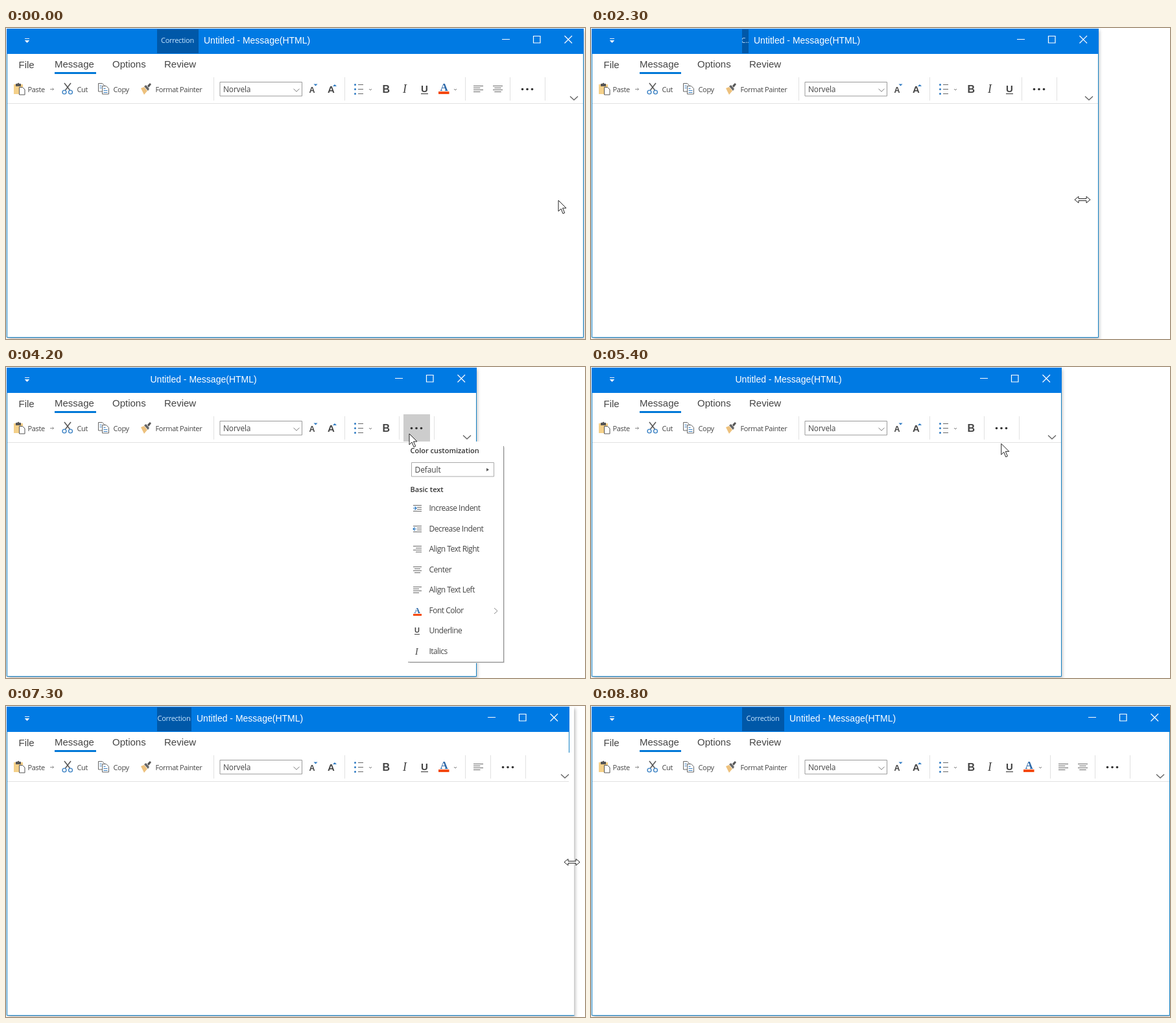
Animation of 893x480 px, one loop 9 s. Source, as an HTML page:

```html
<!DOCTYPE html>
<html lang="en">
<head>
<meta charset="utf-8">
<title>Adaptive ribbon</title>
<style>
html, body { margin: 0; width: 100%; height: 100%; overflow: hidden; background: #fff; }
svg { display: block; width: 893px; height: 480px; }
text { fill: #444; font: 11px "Open Sans", sans-serif; letter-spacing: -.35px; white-space: pre; }
.tab { font: 15px "Liberation Sans", Arial, sans-serif; letter-spacing: 0; }
.title { font: 14px "Liberation Sans", Arial, sans-serif; letter-spacing: 0; fill: #fff; }
.item { font-size: 12px; letter-spacing: -.5px; }
.head { font-weight: 600; letter-spacing: 0; fill: #333; }
.bold { font: bold 16px "Liberation Sans", Arial, sans-serif; letter-spacing: 0; }
.serif { font: 17px "Liberation Serif", serif; letter-spacing: 0; }
.line { fill: none; stroke: #666; }
.sep { stroke: #e1e1e1; }
#body { filter: drop-shadow(2px 3px 2.5px #0004); }
</style>
</head>
<body>
<svg viewBox="0 0 893 480">
  <rect id="body" x="1" y="1" height="477" fill="#fff"/>
  <path id="frame" fill="none" stroke="#1280c4"/>
  <rect id="bar" x="1" y="1" height="39" fill="#007ae3"/>
  <path d="M29 16.5h7M29.5 19.5h6l-3 3z" fill="#fff" stroke="#fff" stroke-width=".9"/>
  <svg id="tab" x="233" y="2" height="37">
    <rect width="100" height="37" fill="#0058a8"/>
    <text id="tabText" y="21" text-anchor="middle" style="fill:#c6e6ff;letter-spacing:-.3px"></text>
  </svg>
  <text id="title" class="title" y="24">Untitled - Message(HTML)</text>
  <path id="controls" fill="none" stroke="#fff" stroke-width="1.2"
    d="M-125 17.5h12M-76.5 12.5h10.5v10.5h-10.5zM-28.5 12l11.5 11.5M-17 12l-11.5 11.5"/>
  <text class="tab" x="19.500" y="62">File</text>
  <text class="tab" x="75" y="61">Message</text>
  <text class="tab" x="164" y="61">Options</text>
  <text class="tab" x="244" y="61">Review</text>
  <rect x="75" y="68" width="64" height="3" fill="#0078d7"/>
  <path id="rule" class="sep"/>
  <g id="ribbon"></g>
  <rect id="hover" x="613" y="73" width="41" height="42" fill="#cdcdcd"/>
  <g id="more">
    <path class="sep" d="M.5 76v36M54.500 76v36"/>
    <g fill="#333"><circle cx="19.500" cy="94.500" r="1.800"/><circle cx="27" cy="94.500" r="1.800"/><circle cx="34.500" cy="94.500" r="1.800"/></g>
  </g>
  <path id="chevron" class="line" stroke-width="1.400" d="M-20 105.500l6 5.500l6 -5.500"/>
  <g id="menu"></g>
  <path id="arrow" d="M0 0v17l4-4l3 7.500l2.700-1.200l-3.200-7.300h5.500z" fill="#fff" stroke="#222" stroke-linejoin="round"/>
  <path id="resize" d="M-12 0l6-5v3.500h12v-3.500l6 5l-6 5v-3.500h-12v3.500z" fill="#fff" stroke="#222"/>
</svg>
<script>
const $ = id => document.getElementById(id);
const set = (id, name, value) => $(id).setAttribute(name, value);
const show = (id, on) => set(id, "visibility", on ? "visible" : "hidden");
const label = (x, y, s, cls = "", style = "") => `<text x="${x}" y="${y}" class="${cls}" style="${style}">${s}</text>`;
const line = (d, color = "#666", w = 1) => `<path d="${d}" fill="none" stroke="${color}" stroke-width="${w}"/>`;
const shape = (d, fill, stroke = "none") => `<path d="${d}" fill="${fill}" stroke="${stroke}"/>`;
const sep = x => `<path class="sep" d="M${x}.5 76v36"/>`;
const drop = (x, y, r = 2) => line(`M${x - r} ${y - r / 2}l${r} ${r}l${r} ${-r}`, "#777");

// Four text lines; align 0 is left, .5 centre, 1 right
function paragraph(x, y, width, align) {
  const short = width * .7;
  return line([0, 1, 2, 3].map(i => {
    const w = i % 2 ? short : width;
    return `M${x + (width - w) * align} ${y + i * 3 + .5}h${w}`;
  }).join(""));
}

const colorA = (x, y, size) => label(x, y, "A", "serif", `fill:#2b67a8;font-size:${size}px;font-weight:bold`);

$("ribbon").innerHTML =
  // Paste, cut, copy, format painter
  shape("M12 87h14v15h-14z", "#f4d08a") + shape("M15 86h2.500q1.500-3 3 0h2.500v4h-8z", "#555") +
  shape("M20.500 91.500h5l3.500 3.500v8h-8.500z", "#fff", "#555") +
  label(33.500, 99, "Paste") + line("M68 94.500h5.500m-2-2l2 2l-2 2", "#777", .8) +
  line("M90 85l8.500 11M100 85l-8.500 11", "#555", 1.500) +
  `<g fill="none" stroke="#3c82c4" stroke-width="1.400"><circle cx="90" cy="99" r="2.900"/><circle cx="99.500" cy="99" r="2.900"/></g>` +
  label(109.500, 99, "Cut") +
  shape("M142.500 85.500h6l3 3v9.500h-9z", "#fff", "#666") + shape("M148.500 89.500h6l4 4v8.500h-10z", "#fff", "#666") +
  line("M144.500 89.500h3M144.500 92.500h3M150.500 93.500h3M150.500 96.500h6M150.500 99.500h6", "#3c82c4") +
  label(165.500, 99, "Copy") +
  shape("M208 93l5-2l5 6l-5 6z", "#edc17d") + shape("M213 90l3-2l5 6l-2 3z", "#666") + shape("M218 89l4-4l2 2l-4 5z", "#555") +
  label(230.500, 99, "Format Painter") + sep(320) +
  // Font box and size buttons
  line("M330 83.500h126.500v21.500h-126.500z", "#999") + label(335, 99, "Norvela", "item", "letter-spacing:-.2px") + drop(448, 96, 4.500) +
  label(467.500, 100, "A", "bold", "font-size:12.500px") + shape("M474.500 86.500h6l-3 3z", "#2b79c2") +
  label(496, 100, "A", "bold", "font-size:15px") + shape("M504 90h6l-3-3z", "#2b79c2") + sep(522) +
  // Bullets and text styles
  [87.500, 94.500, 101.500].map(y => `<circle cx="538.500" cy="${y}" r="1.500" fill="#2b79c2"/>` + line(`M543 ${y}h8`)).join("") +
  drop(562, 95) + label(580.500, 100, "B", "bold") +
  `<g id="tool1">${label(612, 100, "I", "serif", "font-style:italic;font-size:18px")}</g>` +
  `<g id="tool2">${label(640, 98.500, "U", "bold", "font-size:15px")}${line("M640 101.500h11", "#444", 1.200)}</g>` +
  `<g id="tool3">${colorA(669.500, 97, 17)}${shape("M667 98h16.500v4h-16.500z", "#f4490f")}${drop(693, 95)}</g>` +
  `<g id="tool4">${sep(708)}${paragraph(721, 89, 15, 0)}</g>` +
  `<g id="tool5">${paragraph(751, 89, 15, .5)}</g>`;

const indent = (y, dir) => line(`M628 ${y - 4.500}h13M634 ${y - 1.500}h7M634 ${y + 1.500}h7M628 ${y + 4.500}h13`) +
  line(`M628 ${y}h5` + (dir > 0 ? "m-2.500-2.500l2.500 2.500l-2.500 2.500" : "m-2.500-2.500l-2.500 2.500l2.500 2.500"), "#2b79c2", 1.200);
const rows = [
  ["Increase Indent", y => indent(y, 1)],
  ["Decrease Indent", y => indent(y, -1)],
  ["Align Text Right", y => paragraph(628, y - 5, 13, 1)],
  ["Center", y => paragraph(628, y - 5, 13, .5)],
  ["Align Text Left", y => paragraph(628, y - 5, 13, 0)],
  ["Font Color", y => colorA(629.500, y + 4, 13) + shape(`M628 ${y + 5}h13v3h-13z`, "#f4490f") + line(`M753 ${y - 4}l5 4.500l-5 4.500`, "#888")],
  ["Underline", y => label(630, y + 3, "U", "bold", "font-size:11px") + line(`M630 ${y + 5.500}h8`, "#444")],
  ["Italics", y => label(631, y + 5, "I", "serif", "font-style:italic;font-size:14px")]
];
$("menu").innerHTML = shape("M620 115h147v340h-147z", "#fff") +
  line("M767.500 122v334M620 455.500h148", "#8f8f8f") + line("M768.500 124v332.500h-146", "#ddd") +
  label(623.500, 132.500, "Color customization", "head") +
  line("M625.500 147.500h127v21.500h-127z", "#aaa") + label(630.500, 163, "Default", "item", "letter-spacing:-.1px") +
  shape("M741 156l4 2.500l-4 2.500z", "#555") + label(623.500, 193, "Basic text", "head") +
  rows.map(([name, icon], i) => {
    const y = Math.round(218 + i * 31.55);
    return icon(y) + label(652.500, y + 4, name, "item");
  }).join("");

// Piecewise motion: [time, value] pairs
function along(keys, t) {
  let i = 1;
  while (i < keys.length - 1 && t > keys[i][0]) i++;
  const [t0, a] = keys[i - 1], [t1, b] = keys[i];
  const p = Math.max(0, Math.min(1, (t - t0) / (t1 - t0)));
  return a + (b - a) * p;
}
const widthKeys = [[0, 890], [1700, 890], [1800, 889], [1900, 881], [2000, 866], [2300, 782], [2500, 740], [2700, 725],
  [6400, 725], [6700, 757], [7000, 811], [7300, 868], [7600, 892]];
const gapKeys = [[6400, 0], [6700, 8], [7300, 8], [7600, 0]];
const xKeys = [[0, 852], [1000, 873], [1800, 873], [2300, 758], [2700, 709], [3000, 709], [3700, 622], [5300, 622],
  [6200, 719], [6400, 719], [7300, 873], [7600, 885], [8000, 885], [8300, 870], [8800, 735]];
const yKeys = [[0, 266], [1000, 265], [3000, 265], [3700, 103], [5300, 103], [6200, 241], [8000, 241], [8300, 300], [8800, 485]];
const stops = [606, 636, 665, 708, 748, 778];
const within = (t, a, b) => t >= a && t < b;

function tabLabel(room) {
  const text = $("tabText");
  let s = "Correction";
  text.textContent = s;
  while (text.getComputedTextLength() > room && s.length > 1) {
    s = s.slice(0, -1);
    text.textContent = s + "..";
  }
  text.setAttribute("x", room / 2 - .5);
}

function draw(now) {
  const t = Math.floor(now % 9000 / 100) * 100;
  const w = Math.round(along(widthKeys, t)), gap = Math.round(along(gapKeys, t));
  const outer = w + gap, half = (w - 762) / 2;

  set("body", "width", outer - 1);
  set("frame", "d", `M1.500 1v476.500H${outer + .5}` + (gap ? `M${w + .5} 1v71` : "V1"));
  set("bar", "width", w);
  set("rule", "d", `M2 116.500H${w}`);
  set("tab", "width", Math.max(0, half));
  show("tab", half > 0);
  if (half > 0) tabLabel(half);
  set("title", "x", 241 + half);
  set("controls", "transform", `translate(${w})`);
  set("chevron", "transform", `translate(${outer})`);

  let level = 0;
  while (level < 5 && stops[level + 1] + 54 <= outer - 50) level++;
  for (let i = 1; i < 6; i++) show("tool" + i, i <= level);
  set("more", "transform", `translate(${stops[level] - (level ? 1 : 0)})`);

  show("hover", within(t, 3700, 5400));
  set("hover", "fill", t < 5100 ? "#cdcdcd" : "#e3e3e3");
  show("menu", within(t, 3900, 5100));

  const sizing = within(t, 1000, 3100) || within(t, 6200, 8000);
  const place = `translate(${along(xKeys, t)} ${along(yKeys, t)})`;
  for (const id of ["arrow", "resize"]) {
    set(id, "transform", place);
    show(id, (id === "resize") === sizing && t < 8800);
  }
  requestAnimationFrame(draw);
}
draw(performance.now());
</script>
</body>
</html>
```
